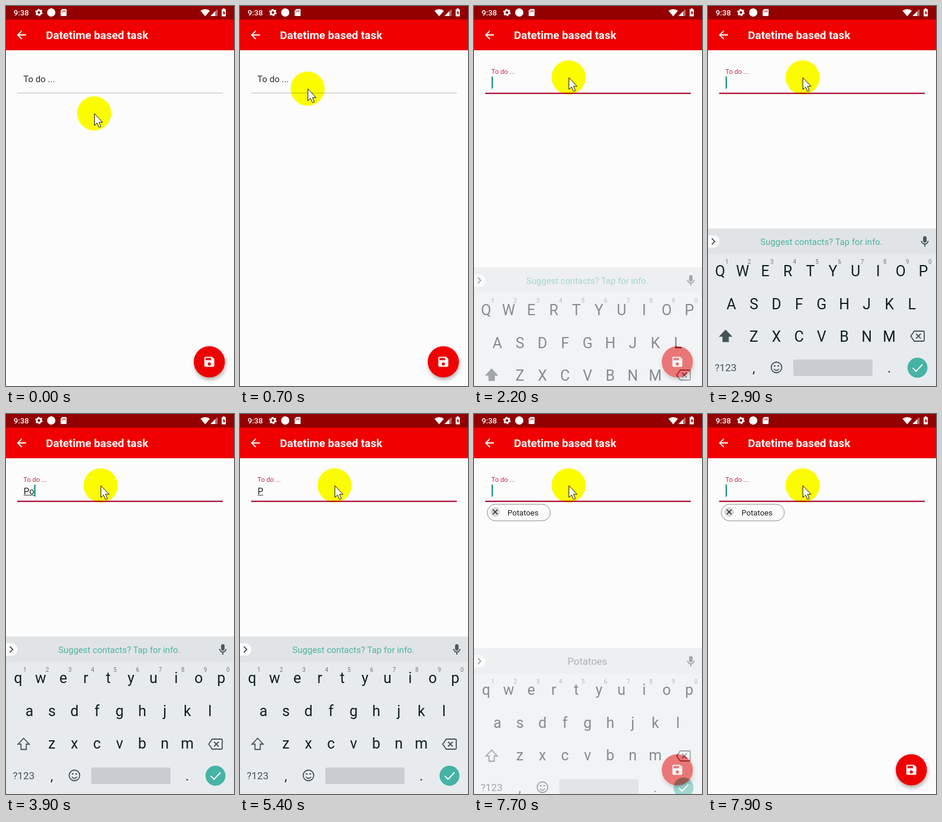
An HTML page for the animation above (8 s loop, 388x644 px).

```html
<!DOCTYPE html>
<html lang="en">
<head>
<meta charset="utf-8">
<title>Datetime based task</title>
<style>
  html, body { margin: 0; width: 100%; height: 100%; overflow: hidden; background: #fcfcfc; }
  svg { display: block; width: 100%; height: 100%; font-family: Roboto, sans-serif; }
  .mid { text-anchor: middle; }
  .keys { font-size: 25px; fill: #10201e; }
  .hints { font-size: 10px; fill: #70797d; }
  .icon { fill: none; stroke: #455458; stroke-width: 1.8; }
  #halo { mix-blend-mode: multiply; }
  #fab { filter: drop-shadow(1px 4px 3px rgba(60, 60, 60, .4)); }
</style>
</head>
<body>
<svg viewBox="0 0 388 644">
  <rect width="388" height="644" fill="#fcfcfc"/>

  <g id="header">
    <rect width="388" height="23" fill="#940000"/>
    <rect y="23" width="388" height="52" fill="#f00000"/>
    <g fill="#fff">
      <text x="13" y="16" font-size="13.2" font-weight="500">9:38</text>
      <circle cx="56" cy="11" r="3.6" fill="none" stroke="#fff" stroke-width="2.6"/>
      <circle cx="56" cy="11" r="5.3" fill="none" stroke="#fff" stroke-width="2" stroke-dasharray="2.8 2.75"/>
      <circle cx="77" cy="11" r="7"/>
      <path d="M96 5h6q1 0 1 1v10q0 1-1 1h-8q-1 0-1-1V8z"/>
      <path d="M95.5 8v2.5M98 7v3.5M100.5 7v3.5" stroke="#940000"/>
      <path d="M331 8q8-5.500 16 0l-8 9.500z"/>
      <path d="M360 5v12h-12z" opacity=".4"/>
      <path d="M356 9v8h-8z"/>
      <path d="M369 4h3v1.500h2v12h-7v-12h2z"/>
      <path d="M371.500 7.500l-3 4.500h2v3.500l3-4.500h-2z" fill="#940000"/>
      <path d="M34 49H20.500M27 42l-7 7 7 7" fill="none" stroke="#fff" stroke-width="1.900"/>
      <text x="68" y="56" font-size="18.9" font-weight="700">Datetime based task</text>
    </g>
  </g>

  <rect id="line" x="19" width="350"/>
  <text id="label" x="29.500">To do ...</text>
  <text id="typed" x="30" y="136" font-size="15.1" fill="#1c1c1c"></text>
  <rect id="underline" x="30" y="137" height="1" fill="#333"/>
  <rect id="caret" y="119.500" width="2" height="20.500" fill="#078a7c"/>

  <g id="chip">
    <rect x="22.500" y="153" width="107.500" height="28" rx="14" fill="#fcfcfc" stroke="#8c8c8c"/>
    <circle cx="36" cy="166" r="8" fill="#d8d8d8"/>
    <path d="M32 162l8 8m0-8l-8 8" stroke="#222" stroke-width="1.500"/>
    <text x="57" y="172" font-size="13.2" fill="#1c1c1c">Potatoes</text>
  </g>

  <g id="fab">
    <circle cx="346" cy="603" r="26.500" fill="#f00000"/>
    <path transform="translate(334.700 591.700) scale(.942)" fill="#fff" d="M17 3H5c-1.110 0-2 .9-2 2v14c0 1.100.890 2 2 2h14c1.100 0 2-.9 2-2V7l-4-4zm-5 16c-1.660 0-3-1.340-3-3s1.340-3 3-3 3 1.340 3 3-1.340 3-3 3zm3-10H5V5h10v4z"/>
  </g>

  <g id="keyboard">
    <rect y="377" width="388" height="270" fill="#e8ebee"/>
    <rect y="377" width="388" height="43" fill="#e1e4e6"/>
    <path d="M0 388.500h9a10.500 10.500 0 0 1 0 21H0z" fill="#fcfcfc"/>
    <path d="M6.500 394l5 5-5 5" class="icon"/>
    <rect x="366" y="390" width="6" height="11" rx="3" fill="#4d5b60"/>
    <path d="M363.500 398a5.500 5.500 0 0 0 11 0M369 404v4" class="icon"/>
    <text id="tip" class="mid" x="193" y="405" font-size="15" fill="#4db3a2">Suggest contacts? Tap for info.</text>
    <g id="words" class="mid" font-size="16.900" fill="#5f696d"></g>
    <g id="hints" class="mid hints"></g>
    <g id="upper" class="mid keys"></g>
    <g id="lower" class="mid keys"></g>
    <path id="shift" d="M30 549.500l9.500 10h-5v9h-9v-9h-5z" class="icon"/>
    <path d="M351 551h15.500q1.500 0 1.500 1.500v14q0 1.500-1.500 1.500H351l-6-8.500zM354 555.500l8 8m0-8l-8 8" class="icon"/>
    <text x="11.500" y="619" font-size="17.200" fill="#455458">?123</text>
    <text class="mid" x="78" y="621" font-size="22" fill="#10201e">,</text>
    <circle cx="116.500" cy="612.500" r="9" class="icon"/>
    <path d="M112 615q4.500 5 9 0M112 610h3m3 0h3" class="icon"/>
    <rect x="145" y="599" width="135" height="28" rx="3" fill="#c9cdd1"/>
    <text class="mid" x="308.500" y="621" font-size="22" fill="#10201e">.</text>
    <circle cx="356.500" cy="613" r="17" fill="#45b3a5"/>
    <path d="M348.500 613.500l5.500 5.500 11-11.500" fill="none" stroke="#fff" stroke-width="2"/>
  </g>

  <circle id="halo" r="29" fill="#ff0"/>
  <path id="arrow" d="M.5.500v20l4.500-4.200 3.300 7.400 3.200-1.400-3.200-7.200h6z" fill="#fff" stroke="#111"/>
</svg>
<script>
const LOOP = 8000, STEP = 100;
const $ = id => document.getElementById(id);
const set = (id, attrs) => { for (const k in attrs) $(id).setAttribute(k, attrs[k]); };
const show = (id, on) => { $(id).style.display = on ? '' : 'none'; };

function addText(parent, content, x, y) {
  const el = document.createElementNS('http://www.w3.org/2000/svg', 'text');
  el.textContent = content;
  el.setAttribute('x', x);
  el.setAttribute('y', y);
  $(parent).append(el);
  return el;
}

// Keyboard letters
const PITCH = 38.42;
[['QWERTYUIOP', 20.5, 458], ['ASDFGHJKL', 39.7, 514], ['ZXCVBNM', 78, 569]].forEach(([row, x, y]) => {
  [...row].forEach((key, i) => {
    addText('upper', key, x + i * PITCH, y);
    addText('lower', key.toLowerCase(), x + i * PITCH, y - 2.5);
  });
});
[...'1234567890'].forEach((digit, i) => addText('hints', digit, 32 + i * PITCH, 437));
const slots = [82, 193, 304].map(x => addText('words', '', x, 405));

// Timed steps: [start, value]
const typing = [
  [0, ''], [3700, 'P'], [3900, 'Po'], [4900, 'P'], [5500, 'Po'], [5700, 'Pot'], [5800, 'Pota'],
  [6000, 'Potat'], [6100, 'Potato'], [6300, 'Potatoe'], [6700, 'Potatoes'], [7600, '']
];
const suggestions = [
  [0, null], [5600, ['Post', 'Point', 'Pop']], [5800, ['Pots', 'Pot', 'Potent']],
  [5900, ['Potato', 'Pots', 'Potatoes']], [6200, ['Potato', 'Potatoes', 'Potatoe']],
  [6400, ['Potatoe', 'Potatoes', 'Potato\u2019s']], [6800, ['', 'Potatoes', '']]
];
const caretOn = [
  [0, false], [1900, true], [2400, false], [2900, true], [3400, false], [3700, true], [4400, false],
  [4900, true], [5400, false], [5500, true], [7300, false], [7600, true]
];
// Tweened tracks: [time, ...values]
const pointerPath = [[0, 150, 182], [900, 110, 134], [1700, 110, 134], [2100, 161, 121]];
const keyboardPath = [
  [2100, 66, 0], [2200, 66, .5], [2300, 10, 1], [2400, 0, 1],
  [7600, 0, 1], [7700, 20, .5], [7800, 66, 0]
];
const labelPath = [[1800, 129, 15.1], [2000, 115, 11.3]];

const at = (steps, t) => steps.filter(s => s[0] <= t).pop()[1];
const smooth = p => p * p * (3 - 2 * p);

function tween(track, t, ease = p => p) {
  const i = track.findIndex(k => k[0] > t);
  if (i === 0) return track[0].slice(1);
  if (i < 0) return track[track.length - 1].slice(1);
  const [a, b] = [track[i - 1], track[i]];
  const p = ease((t - a[0]) / (b[0] - a[0]));
  return a.slice(1).map((v, j) => v + (b[j + 1] - v) * p);
}

function draw(t) {
  const focused = t >= 1900;
  const [labelY, labelSize] = tween(labelPath, t);
  set('label', { y: labelY, 'font-size': labelSize, fill: focused ? '#c0264c' : '#2a2a2a' });
  set('line', focused ? { y: 146.8, height: 2.4, fill: '#ad1a40' } : { y: 147, height: 1, fill: '#b9b9b9' });

  const word = at(typing, t);
  $('typed').textContent = word;
  const width = word ? $('typed').getComputedTextLength() : 0;
  set('underline', { width });
  set('caret', { x: 30 + width });
  show('caret', at(caretOn, t));
  show('chip', t >= 7600);

  const [drop, alpha] = tween(keyboardPath, t);
  set('keyboard', { transform: `translate(0 ${drop})`, opacity: alpha });
  show('keyboard', alpha > 0);
  const caps = t < 3700;
  show('upper', caps);
  show('lower', !caps);
  $('shift').style.fill = caps ? '#455458' : 'none';
  const words = at(suggestions, t);
  show('tip', !words);
  slots.forEach((slot, i) => { slot.textContent = words ? words[i] : ''; });

  const [x, y] = tween(pointerPath, t, smooth);
  for (const id of ['halo', 'arrow']) set(id, { transform: `translate(${x} ${y})` });
}

const start = performance.now();
function tick() {
  const t = (performance.now() - start) % LOOP;
  draw(Math.floor(t / STEP) * STEP);
  requestAnimationFrame(tick);
}
tick();
</script>
</body>
</html>
```
